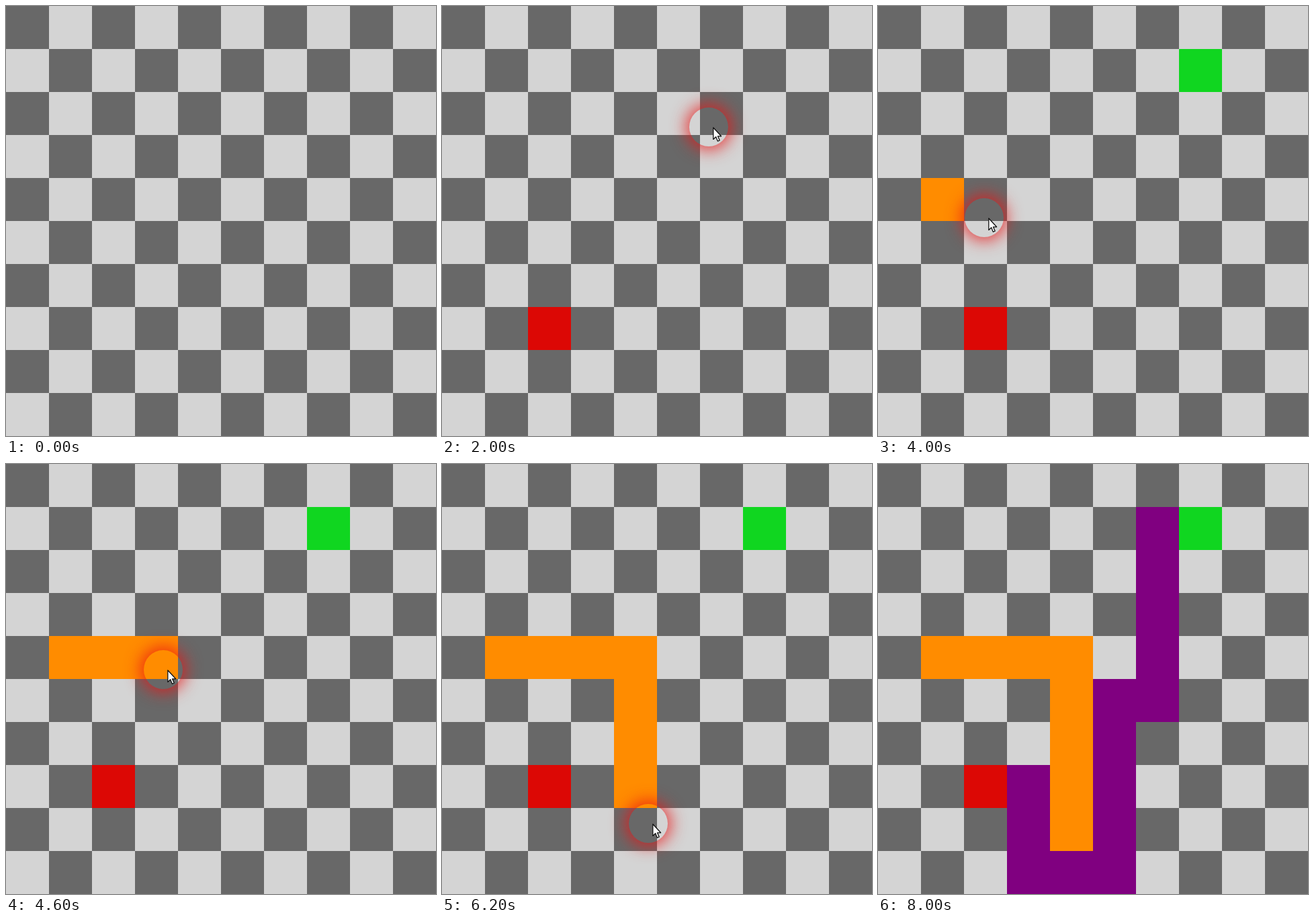
Write an HTML page that moves like this. It is 640x640 px and loops after 8.8 s.

```html
<!DOCTYPE html>
<html lang="en">
<head>
<meta charset="utf-8">
<title>Grid path finder</title>
<style>
  html, body { margin: 0; width: 100%; height: 100%; overflow: hidden; }
  #board {
    position: relative; width: 640px; height: 640px; overflow: hidden;
    background: repeating-conic-gradient(#d4d4d4 0 25%, #686868 0 50%) 0 0 / 128px 128px;
  }
  /* One unit is one cell; each line is a run of cells through their centres. */
  #cells {
    position: absolute; left: 0; top: 0; fill: none;
    stroke-width: 1; stroke-linecap: square; shape-rendering: crispEdges;
  }
  #end { stroke: #dc0805; }
  #start { stroke: #10d620; }
  #wall { stroke: #ff8c00; }
  #path { stroke: #800080; }
  #pointer { position: absolute; left: 0; top: 0; }
  #halo {
    position: absolute; left: -29px; top: -29px; width: 58px; height: 58px;
    border-radius: 50%; box-shadow: 0 0 23px 5px rgba(235, 20, 20, .78);
  }
  #arrow { position: absolute; left: 6px; top: 0; overflow: visible; }
</style>
</head>
<body>
<div id="board">
  <svg id="cells" width="640" height="640" viewBox="-.5 -.5 10 10">
    <path id="end" d="M2 7h0"/>
    <path id="start" d="M7 1h0"/>
    <path id="wall" d="M1 4H4V8"/>
    <path id="path" d="M3 7V9H5V5H6V1"/>
  </svg>
  <div id="pointer">
    <div id="halo"></div>
    <svg id="arrow" width="14" height="24">
      <path d="M.8 1V18.4L4.7 14.8 7.4 21.2 10.2 20 7.5 13.8H12.6Z"
            fill="#fff" stroke="#111" stroke-width="1.3" stroke-linejoin="round"/>
    </svg>
  </div>
</div>
<script>
  const LOOP = 8800, STEP = 200;
  const WALL_FROM = 3800, WALL_PACE = 375, WALL_CELLS = 8;
  const get = id => document.getElementById(id);
  const show = (id, on) => { get(id).style.visibility = on ? 'visible' : 'hidden'; };

  // Key points of the pointer's route
  const route = [
    { t: 400, x: 152, y: 604 },
    { t: 800, x: 154, y: 480 },
    { t: 1200, x: 154, y: 480 },
    { t: 2000, x: 397, y: 180 },
    { t: 2500, x: 474, y: 96 },
    { t: 3200, x: 336, y: 192 },
    { t: 3800, x: 98, y: 290 },
    { t: 4000, x: 158, y: 315 },
    { t: 5000, x: 284, y: 300 },
    { t: 5200, x: 285, y: 349 },
    { t: 6200, x: 307, y: 535 },
    { t: 7000, x: 310, y: 720 }
  ];

  function movePointer(t) {
    const i = route.findIndex(p => p.t > t);
    show('pointer', i > 0);
    if (i < 1) return;
    const a = route[i - 1], b = route[i], k = (t - a.t) / (b.t - a.t);
    const mix = axis => Math.round(a[axis] + (b[axis] - a[axis]) * k);
    get('pointer').style.transform = `translate(${mix('x')}px, ${mix('y')}px)`;
  }

  function growWall(t) {
    const count = Math.min(WALL_CELLS, 1 + Math.floor((t - WALL_FROM) / WALL_PACE));
    show('wall', count > 0);
    // Square caps add half a cell at both ends.
    get('wall').style.strokeDasharray = `${Math.max(0, count - 1)} 99`;
  }

  function draw(ms) {
    const t = Math.floor((ms % LOOP) / STEP) * STEP;
    show('end', t >= 1200);
    show('start', t >= 2600);
    show('path', t >= 7800);
    growWall(t);
    movePointer(t);
  }

  const begin = performance.now();
  function tick() {
    draw(performance.now() - begin);
    requestAnimationFrame(tick);
  }
  tick();
</script>
</body>
</html>
```
